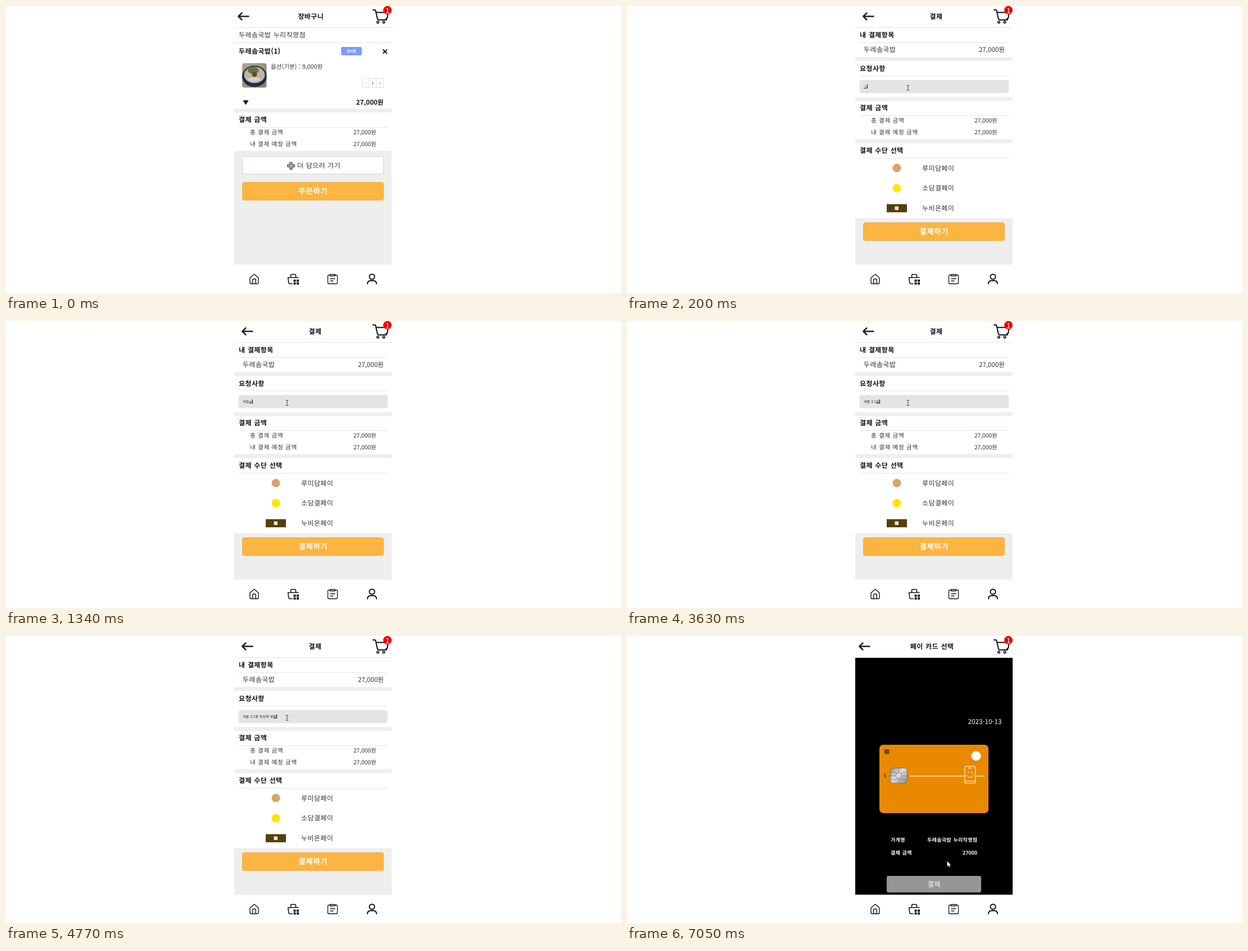
Write an HTML page that moves like this. It is 1094 by 512 pixels and loops after 8 s.

```html
<!DOCTYPE html>
<html lang="ko">
<head>
<meta charset="utf-8">
<title>장바구니</title>
<style>
html, body { margin: 0; width: 100%; height: 100%; overflow: hidden; background: #fff; }
body { position: relative; font-family: "Noto Sans CJK KR", "Noto Sans CJK JP", "Noto Sans", sans-serif; }
svg { position: absolute; left: 0; top: 0; display: block; }
text { font-size: 12px; letter-spacing: .4px; word-spacing: .7px; fill: #333; text-rendering: geometricPrecision; }
.b { font-weight: 700; fill: #111; }
.s { font-size: 10.6px; letter-spacing: .6px; word-spacing: .2px; }
.n { font-size: 10.3px; letter-spacing: -.05px; }
.p { font-size: 11.6px; letter-spacing: 0; }
.w { fill: #fff; }
.cta { font-size: 13.5px; letter-spacing: .6px; }
.info text { font-size: 9px; font-weight: 700; letter-spacing: .3px; fill: #fff; }
.tiny text { font-size: 6px; letter-spacing: 0; }
.mid { text-anchor: middle; }
.end { text-anchor: end; }
.gap { fill: #eee; }
.rule { fill: #e6e6e6; }
.ico { fill: none; stroke: #111; stroke-width: 1.6; stroke-linecap: round; stroke-linejoin: round; }

/* screens */
.cart, .order, .card, .field, .beam { animation: 8s step-end infinite; }
.cart { animation-name: cart; }
.order, .field { animation-name: order; }
.card { animation-name: card; }
.beam { animation-name: beam; }
@keyframes cart { 0% { visibility: visible } 1.25%, 100% { visibility: hidden } }
@keyframes order { 0% { visibility: hidden } 1.25% { visibility: visible } 88.125%, 100% { visibility: hidden } }
@keyframes card { 0% { visibility: hidden } 88.125%, 100% { visibility: visible } }
@keyframes beam { 0% { visibility: hidden } 2.5% { visibility: visible } 88.125%, 100% { visibility: hidden } }

/* typed request: one row per state, moved through a window */
.field { position: absolute; left: 421px; top: 139px; width: 250px; height: 10px; overflow: hidden; }
.rows { animation: type 8s step-end infinite; }
.rows p { margin: 0; height: 10px; font-size: 6px; line-height: 10px; letter-spacing: .1px; word-spacing: .2px;
  color: #111; white-space: pre; text-rendering: geometricPrecision; }
.rows u { text-decoration-thickness: 1px; text-underline-offset: 0; }
.rows u::after { content: ""; display: inline-block; width: 1px; height: 7px; background: #000; vertical-align: -1px; }
@keyframes type {
  0% { transform: none }
  2.5% { transform: translateY(-10px) }
  16.75% { transform: translateY(-20px) }
  31% { transform: translateY(-30px) }
  45.375% { transform: translateY(-40px) }
  59.625% { transform: translateY(-50px) }
  73.875%, 100% { transform: translateY(-60px) }
}
</style>
</head>
<body>
<svg width="1094" height="512" viewBox="0 0 1094 512">
  <defs>
    <linearGradient id="metal" x2="1" y2="1">
      <stop stop-color="#8d8d8d"/><stop offset=".45" stop-color="#dedede"/><stop offset="1" stop-color="#858585"/>
    </linearGradient>
    <linearGradient id="table" x2="1" y2="1">
      <stop stop-color="#b3a78c"/><stop offset="1" stop-color="#8a7a62"/>
    </linearGradient>
    <clipPath id="round"><rect x="420" y="102" width="43.5" height="43.5" rx="4"/></clipPath>
    <path id="back" d="M431.5 18.5H413.5M419.5 12.5L413.3 18.5L419.5 24.5" fill="none" stroke="#222" stroke-width="2.5" stroke-linecap="round" stroke-linejoin="round"/>
    <g id="sum">
      <text class="b" x="414" y="207.4">결제 금액</text>
      <rect class="rule" x="414" y="216" width="265" height="1"/>
      <text class="s" x="434" y="228.8">총 결제 금액</text>
      <text class="n end" x="658.5" y="228.8">27,000원</text>
      <text class="s" x="434" y="249.8">내 결제 예정 금액</text>
      <text class="n end" x="658.5" y="249.8">27,000원</text>
    </g>
  </defs>
  <rect width="1094" height="512" fill="#fff"/>

  <g class="cart">
    <use href="#back"/>
    <text class="b mid" x="542.3" y="22.9">장바구니</text>
    <text x="414" y="56">두레솜국밥 누리직영점</text>
    <rect class="rule" x="406" y="65" width="280" height="1"/>
    <text class="b" x="414" y="85">두레솜국밥(1)</text>
    <rect x="596" y="73" width="37" height="15" rx="3" fill="#7d9dfb"/>
    <g class="tiny">
      <text class="b w mid" x="614.5" y="82.7">참여중</text>
      <text class="mid" x="640" y="139.8">-</text>
      <text class="mid" x="652" y="139.8">3</text>
      <text class="mid" x="665" y="139.8">+</text>
    </g>
    <path d="M670.7 77.7L677.7 84.7M677.7 77.7L670.7 84.7" stroke="#111" stroke-width="2"/>
    <g clip-path="url(#round)">
      <rect x="420" y="102" width="44" height="44" fill="url(#table)"/>
      <ellipse cx="442" cy="125.5" rx="22" ry="19" fill="#1c2c50"/>
      <ellipse cx="442" cy="123" rx="18.5" ry="14.5" fill="#b9b8a4"/>
      <ellipse cx="440" cy="115" rx="10" ry="6" fill="#617640"/>
      <circle cx="442" cy="122" r="4.5" fill="#70402f"/>
      <ellipse cx="441" cy="131" rx="11" ry="3.5" fill="#d6d5c5"/>
    </g>
    <text class="s" x="471" y="111.5" style="letter-spacing:.05px">옵션(기본) : 9,000원</text>
    <path d="M634.5 129.5h37v16h-37zM645.5 129.5v16M658.5 129.5v16" fill="none" stroke="#dedede"/>
    <path d="M421.5 168.3h10L426.5 176.5z" fill="#111"/>
    <text class="b p end" x="671.5" y="176.4">27,000원</text>
    <rect class="gap" x="406" y="183" width="280" height="7"/>
    <use href="#sum"/>
    <rect class="gap" x="406" y="258.5" width="280" height="203"/>
    <rect x="420.5" y="268.5" width="251" height="31" rx="3.5" fill="#fff" stroke="#dccfd2"/>
    <path d="M505 279h4v4h4.2v4h-4.2v4.2h-4v-4.2h-4.2v-4h4.2z" fill="#a9b7a5" stroke="#333" stroke-width="1.1"/>
    <text x="518" y="289" style="letter-spacing:.3px">더 담으러 가기</text>
    <rect x="420.5" y="314.5" width="251" height="32" rx="3.5" fill="#fbb540" stroke="#eab05a"/>
    <text class="b w cta mid" x="546.3" y="335.2">주문하기</text>
  </g>

  <g class="order">
    <use href="#back" x="7"/>
    <text class="b mid" x="550" y="22.9">결제</text>
    <text class="b" x="414" y="56">내 결제항목</text>
    <rect class="rule" x="414" y="65" width="265" height="1"/>
    <text x="421" y="82">두레솜국밥</text>
    <text class="p end" x="672" y="82.3">27,000원</text>
    <rect class="gap" x="406" y="91" width="280" height="7"/>
    <text class="b" x="414" y="116">요청사항</text>
    <rect class="rule" x="414" y="124" width="265" height="1"/>
    <rect x="413.5" y="132" width="265.5" height="23.5" rx="4" fill="#e4e4e4"/>
    <rect class="gap" x="406" y="162.5" width="280" height="7"/>
    <use href="#sum" y="-21"/>
    <rect class="gap" x="406" y="237.5" width="280" height="7"/>
    <text class="b" x="414" y="262">결제 수단 선택</text>
    <rect class="rule" x="414" y="271" width="265" height="1"/>
    <circle cx="480" cy="289" r="7.5" fill="#d9a468"/>
    <text x="525" y="293.5">루미담페이</text>
    <circle cx="480" cy="325" r="7.5" fill="#ffe500"/>
    <text x="525" y="329">소담결페이</text>
    <rect x="462" y="353.5" width="36" height="14.5" fill="#54400f"/>
    <rect x="476.5" y="357.5" width="6.5" height="6.5" fill="#efe8c8"/>
    <text x="525" y="365.4">누비온페이</text>
    <rect class="gap" x="406" y="378.5" width="280" height="83"/>
    <rect x="420.5" y="386.5" width="251" height="32" rx="3.5" fill="#fbb540" stroke="#eab05a"/>
    <text class="b w cta mid" x="546.3" y="407.2">결제하기</text>
  </g>

  <g class="card">
    <use href="#back"/>
    <text class="b mid" x="542.5" y="22.9">페이 카드 선택</text>
    <rect x="406" y="39" width="280" height="422.5"/>
    <text class="w end" x="666.5" y="157" style="font-size:11.6px;letter-spacing:.05px">2023-10-13</text>
    <rect x="449" y="194" width="194" height="122" rx="7" fill="#e98900"/>
    <rect x="458" y="202" width="8.5" height="8.5" fill="#6b4512"/>
    <circle cx="621" cy="214" r="8.5" fill="#fff"/>
    <path d="M461 245l-3.5 4 3.5 4" fill="none" stroke="#6b4512" stroke-width="1.5"/>
    <rect x="468.5" y="235.5" width="30" height="27.5" rx="6" fill="url(#metal)" stroke="#6f6249" stroke-width=".8"/>
    <path d="M469 243h8l4 3M469 249.5h9M469 256h8l4-3M498 243h-8l-4 3M498 249.5h-9M498 256h-8l-4-3M483.5 236v8M483.5 255v8" fill="none" stroke="#777" stroke-width=".8"/>
    <circle cx="483.5" cy="249.5" r="5.5" fill="none" stroke="#777" stroke-width=".8"/>
    <g fill="none" stroke="#fbe3b8" stroke-width="1.3">
      <path d="M502.5 250H601M620 250h16"/>
      <rect x="601" y="232.5" width="18.5" height="30.5" rx="3"/>
      <path d="M607 235.5h6M601 259h18.5M607.5 242v3M613.5 242v3M604.5 248q5.5 9 11 0"/>
    </g>
    <g class="info">
      <text x="469" y="367.3">가게명</text>
      <text class="end" x="623.3" y="367.3">두레솜국밥 누리직영점</text>
      <text x="469" y="390.3">결제 금액</text>
      <text class="end" x="623" y="390.3" style="letter-spacing:-.1px">27000</text>
    </g>
    <path d="M569.5 402v9l2.1-1.9 1.4 3.1 1.7-.8-1.4-3h2.9z" fill="#fff"/>
    <rect x="462" y="428" width="168" height="29.5" rx="3" fill="#969696"/>
    <text class="w mid" x="546.2" y="447">결제</text>
  </g>

  <!-- header and bottom bar -->
  <rect class="rule" x="406" y="38" width="280" height="1"/>
  <g class="ico">
    <path d="M653 7h3.2q1 0 1.3 1.3L660.5 22q.6 2.8 3 2.8H677M658.3 11.5H679.5L678.5 20.5q-.4 2.3-2.8 2.3" style="stroke-width:2"/>
    <circle cx="661.5" cy="28.8" r="1.8"/>
    <circle cx="672" cy="28.8" r="1.8"/>
  </g>
  <circle cx="678.5" cy="7.5" r="7.5" fill="#f20000"/>
  <text class="w mid" x="678.5" y="12.5" style="font-size:13px;letter-spacing:0">1</text>

  <g class="ico">
    <path d="M434 485l7.5-6.5 7.5 6.5v8.5q0 2-2 2h-11q-2 0-2-2zM438.7 495v-6.5q0-1.5 1.5-1.5h2.6q1.5 0 1.5 1.5v6.5" style="stroke-width:1.4"/>
    <path d="M509 495.5h-4.5q-1.3 0-1.6-1.5L501.7 484.5H520M506.5 484v-3q0-2.3 2.3-2.3h4.4q2.3 0 2.3 2.3v3"/>
    <path d="M576.5 480h-2q-2 0-2 2v11.5q0 2 2 2h13q2 0 2-2V482q0-2-2-2h-2M576.5 479h9v2.5h-9zM577 486.5h8M577 490.5h5" style="stroke-width:1.3"/>
    <circle cx="651" cy="483" r="4.6" style="stroke-width:2"/>
    <path d="M643 495.5q.3-5.5 5.5-5.5h5q5.2 0 5.5 5.5" style="stroke-width:2"/>
  </g>
  <path d="M511.5 488h4v4h-4zM517 488h4v4h-4zM511.5 493h4v4h-4zM517 493h4v4h-4z" fill="#111"/>
</svg>

<div class="field"><div class="rows">
  <p></p>
  <p><u>ㄱ</u></p>
  <p>국갑<u>ㅂ</u></p>
  <p>국밥 3<u>ㄱ</u></p>
  <p>국밥 3그<u>르</u></p>
  <p>국밥 3그릇 맛있게 부<u>탁</u></p>
  <p>국밥 3그릇 맛있게 부탁드려<u>요</u></p>
</div></div>

<svg class="beam" width="1094" height="512" viewBox="0 0 1094 512">
  <path d="M497.5 141.5h5M500 141.5v9M497.5 150.5h5" fill="none" stroke="#555" stroke-width="1.1"/>
</svg>
</body>
</html>
```
